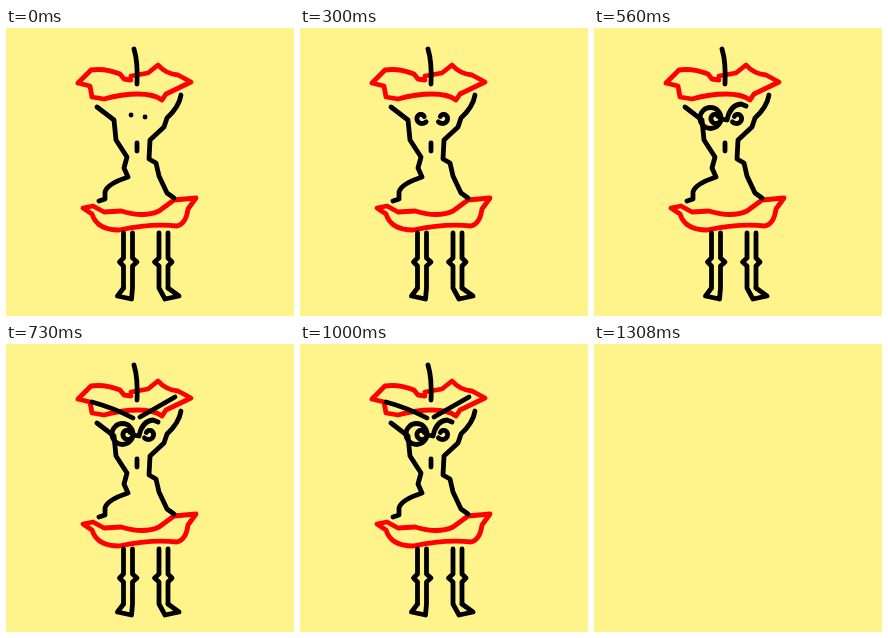
Recreate the animation shown at these times as an HTML page. Size 288 by 288 pixels, loop 1400 ms.

```html
<!DOCTYPE html>
<html lang="en">
<head>
<meta charset="utf-8">
<title>Apple core</title>
<style>
html, body { margin: 0; width: 100%; height: 100%; overflow: hidden; background: #fff38b; }
svg { display: block; width: 100vw; height: 100vh; }
path { fill: none; stroke-width: 4.8; stroke-linecap: round; stroke-linejoin: round; }
</style>
</head>
<body>
<svg id="stage" viewBox="0 0 288 288"></svg>
<script>
const NS = 'http://www.w3.org/2000/svg';
const LOOP = 1400;
const GONE = 1170;
const stage = document.getElementById('stage');
const parts = [];

// A set of pen strokes visible from one time to another
function part(from, to, draw) {
  const g = stage.appendChild(document.createElementNS(NS, 'g'));
  parts.push({ g, from, to });
  draw((d, color = '#000') => {
    const el = g.appendChild(document.createElementNS(NS, 'path'));
    el.setAttribute('d', d);
    el.setAttribute('stroke', color);
  });
}

// dir is the side the foot points to: -1 left, 1 right
function leg(pen, x, dir, toe) {
  const at = (dx, y) => `${x + dir * dx} ${y}`;
  const side = (dx, knee) =>
    `M${at(dx, 205)}L${at(dx, 230)}L${at(dx + knee, 234)}L${at(dx, 238)}L${at(dx, 260)}`;
  pen(side(0, -4.5) + `L${at(toe - 14, 271)}L${at(toe, 268)}L${at(9, 260)}`);
  pen(side(9, 4));
}

// Spiral opening outwards from near the eye's centre
function eye(cx, cy, dir) {
  let d = '';
  for (let i = 0; i <= 24; i++) {
    const u = i / 24, r = 3 + 3 * u, a = (210 + 290 * u) * Math.PI / 180;
    d += (i ? 'L' : 'M') + (cx + dir * r * Math.cos(a)) + ' ' + (cy + r * Math.sin(a));
  }
  return d;
}

part(0, GONE, pen => {
  const red = '#f00';
  pen('M72 55L85 42Q99 40 114 46L118 51L125 52M125 48L142 45L152 37Q160 46 172 47L185 54L160 66L156 72Q148 66 132 66T98 71L86 69L84 58L72 55', red);
  pen('M77 180L87 178L98 184L115 183Q138 190 153 183L168 172L190 170L182 181Q180 196 171 198Q146 195 113 202Q91 202 86 186Z', red);
  pen('M128 21Q132 34 131 56');
  pen('M91 79L108 92L110 112L121 129L118 140L122 149Q101 156 99 164L99 171L93 173');
  pen('M175 67Q173 79 161 90L158 99L144 112L143 131L150 135L153 148L161 165L168 170');
  pen('M131 115v8');
  leg(pen, 126.5, -1, 15);
  leg(pen, 153, 1, 20);
});

part(0, 300, pen => pen('M125 87h.1M139 89h.1'));

part(300, GONE, pen => {
  pen(eye(121.5, 90, -1));
  pen(eye(143, 90, 1));
});

part(560, GONE, pen => {
  pen('M106 90a10.5 10.5 0 1 0 21 0a10.5 10.5 0 1 0 -21 0');
  pen('M127 91L133 92Q136 77 147 76L152 78');
});

part(730, GONE, pen => pen('M86 58Q108 64 127 74M134 73L169 53'));

function draw(t) {
  for (const { g, from, to } of parts) {
    g.style.display = t >= from && t < to ? '' : 'none';
  }
}

const start = performance.now();
function tick() {
  draw((performance.now() - start) % LOOP);
  requestAnimationFrame(tick);
}
tick();
</script>
</body>
</html>
```
